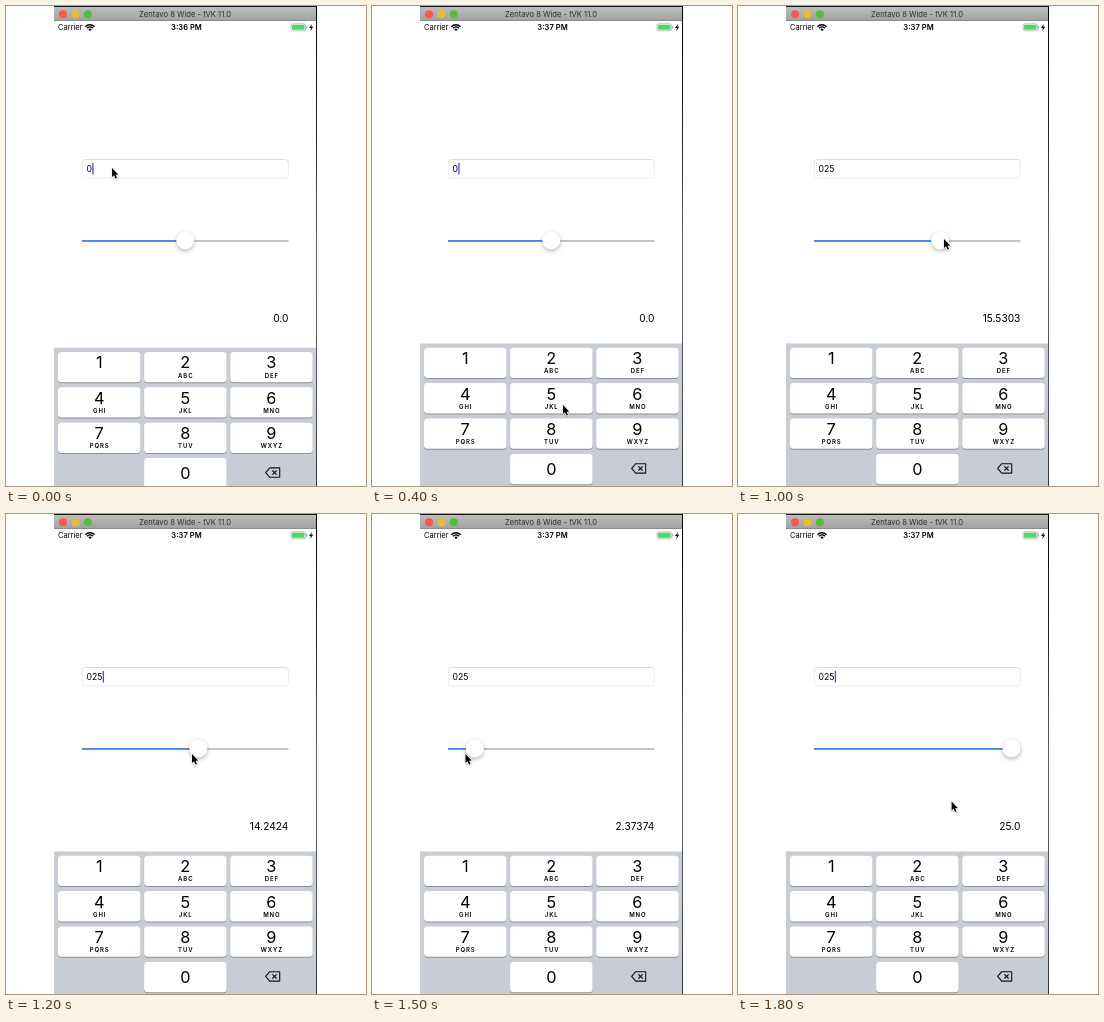
These frames come from a looping animation (360 px wide and 480 px high, 1900 ms). An HTML page with a canvas:

```html
<!DOCTYPE html>
<html lang="en">
<head>
<meta charset="utf-8">
<title>Slider demo</title>
<style>
html, body { margin: 0; width: 100%; height: 100%; overflow: hidden; background: #fff; }
canvas { display: block; width: 360px; height: 480px; }
</style>
</head>
<body>
<canvas id="stage"></canvas>
<script>
const W = 360, H = 480, STEP = 100;
const canvas = document.getElementById('stage');
const ctx = canvas.getContext('2d');
const ratio = window.devicePixelRatio || 1;
canvas.width = W * ratio;
canvas.height = H * ratio;

// One entry per step: pointer x, pointer y, caret visible, typed text, slider value (null = untouched)
const steps = [
  [106, 162, 1, '0', null],
  [106, 162, 0, '0', null],
  [130, 232, 1, '0', null],
  [172, 335, 0, '0', null],
  [191, 399, 1, '0', null],
  [187, 364, 1, '0', null],
  [186, 360, 1, '02', null],
  [187, 392, 0, '02', null],
  [188, 388, 1, '025', null],
  [184, 236, 1, '025', null],
  [206, 233, 0, '025', 15.5303],
  [229, 236, 0, '025', 18.8131],
  [186, 240, 1, '025', 14.2424],
  [144.3, 242, 0, '025', 9.31818],
  [119, 241, 1, '025', 5.85859],
  [93.5, 240, 0, '025', 2.37374],
  [66, 240, 0, '025', 0],
  [228, 241, 1, '025', 18.4343],
  [213.6, 287.5, 1, '025', 25]
];

function text(str, x, y, size, { weight = 400, align = 'left', color = '#000', spacing = 0 } = {}) {
  ctx.font = `${weight} ${size}px Inter, sans-serif`;
  ctx.letterSpacing = spacing + 'px';
  ctx.textAlign = align;
  ctx.fillStyle = color;
  ctx.fillText(str, x + (align === 'center' ? spacing / 2 : 0), y);
}

function rect(x, y, w, h, color) {
  ctx.fillStyle = color;
  ctx.fillRect(x, y, w, h);
}

function roundRect(x, y, w, h, r, fill, stroke, line = 1) {
  ctx.beginPath();
  ctx.roundRect(x, y, w, h, r);
  if (fill) { ctx.fillStyle = fill; ctx.fill(); }
  if (stroke) { ctx.strokeStyle = stroke; ctx.lineWidth = line; ctx.stroke(); }
}

function disc(x, y, r, color) {
  ctx.beginPath();
  ctx.arc(x, y, r, 0, Math.PI * 2);
  ctx.fillStyle = color;
  ctx.fill();
}

function polygon(points, fill) {
  ctx.beginPath();
  points.forEach(([x, y]) => ctx.lineTo(x, y));
  ctx.closePath();
  if (fill) { ctx.fillStyle = fill; ctx.fill(); }
}

function vertical(y0, y1, ...colors) {
  const g = ctx.createLinearGradient(0, y0, 0, y1);
  colors.forEach((c, i) => g.addColorStop(i / (colors.length - 1), c));
  return g;
}

function drawWindow() {
  rect(48, 0, 263, 15, vertical(1, 15, '#bdbdbd', '#a0a0a0'));
  rect(48, 0, 263, 1, '#181818');
  rect(48, 14.3, 263, 0.7, '#858585');
  rect(310, 0, 1, H, vertical(0, H, '#000', '#222', '#5c6470', '#555b66', '#30343c'));
  ['#fc5650', '#e6bd35', '#55bd38'].forEach((c, i) => disc(57 + i * 12.4, 8.2, 4, c));
  text('Zentavo 8 Wide - tVK 11.0', 179, 11.2, 7.6, { align: 'center', color: '#303030' });
}

function drawStatus(clock) {
  text('Carrier', 52, 24.3, 7.5);
  ctx.strokeStyle = '#000';
  ctx.lineWidth = 1.4;
  for (const r of [6.3, 4]) {
    ctx.beginPath();
    ctx.arc(84, 25, r, -Math.PI * 0.76, -Math.PI * 0.24);
    ctx.stroke();
  }
  ctx.beginPath();
  ctx.moveTo(84, 25);
  ctx.arc(84, 25, 2.3, -Math.PI * 0.76, -Math.PI * 0.24);
  ctx.fillStyle = '#000';
  ctx.fill();
  text(clock, 180.5, 24.3, 7.6, { weight: 600, align: 'center' });
  roundRect(285, 17.8, 14.6, 7, 1.8, null, '#8d9a8f', 0.6);
  roundRect(286, 18.8, 12.6, 5, 1, '#4cd964');
  rect(300.3, 20, 0.8, 2.6, '#8d9a8f');
  polygon([[306, 18], [303, 22], [304.9, 22], [304.2, 25], [307.2, 20.7], [305.3, 20.7]], '#000');
}

function drawField(value, caret) {
  roundRect(76.3, 153.5, 206, 18.5, 3, '#fff', vertical(153, 172, '#d4d4d4', '#ededed', '#e6e6e6'), 0.8);
  text(value, 80.5, 166, 8.7);
  if (caret) rect(80.8 + ctx.measureText(value).width, 157, 1.3, 11.5, '#4350d8');
}

function drawSlider(value) {
  const x = 85 + 188.5 * (value === null ? 0.5 : value / 25);
  rect(76, 234.2, 206.5, 1.5, '#b2b2b2');
  rect(76, 234.2, x - 76, 1.5, '#2a7df0');
  ctx.save();
  ctx.shadowColor = 'rgba(0,0,0,0.28)';
  ctx.shadowBlur = 4 * ratio;
  ctx.shadowOffsetY = 1.6 * ratio;
  disc(x, 234.5, 9, '#fff');
  ctx.restore();
  const v = value || 0;
  text(Number.isInteger(v) ? v.toFixed(1) : String(v), 282.4, 316.4, 10.2, { align: 'right' });
}

function drawBackspace(x, y) {
  polygon([[x - 7, y], [x - 3, y - 4.7], [x + 7, y - 4.7], [x + 7, y + 4.7], [x - 3, y + 4.7]]);
  ctx.strokeStyle = '#111';
  ctx.lineWidth = 1.1;
  ctx.lineJoin = 'round';
  ctx.stroke();
  ctx.beginPath();
  for (const s of [-1, 1]) {
    ctx.moveTo(x - 0.3, y - 2.1 * s);
    ctx.lineTo(x + 3.9, y + 2.1 * s);
  }
  ctx.stroke();
}

function drawKey(label, letters, col, row) {
  const x = 52 + col * 86.1, y = 341.7 + row * 35.4;
  roundRect(x, y + 1, 82.5, 30.3, 3.5, '#8d9096');
  roundRect(x, y, 82.5, 30.3, 3.5, '#fff');
  const mid = x + 41.2;
  text(label, mid, letters === null ? y + 20.9 : y + 16.5, 16.3, { align: 'center' });
  if (letters) text(letters, mid, y + 25.6, 6, { weight: 600, align: 'center', spacing: 0.9 });
}

function drawKeyboard(drop) {
  ctx.save();
  ctx.translate(0, drop);
  rect(48, 337.5, 262, H, '#c8ccd4');
  ['', 'ABC', 'DEF', 'GHI', 'JKL', 'MNO', 'PQRS', 'TUV', 'WXYZ']
    .forEach((letters, i) => drawKey(String(i + 1), letters, i % 3, Math.floor(i / 3)));
  drawKey('0', null, 1, 3);
  drawBackspace(266.7, 462.4);
  ctx.restore();
}

function drawPointer(x, y) {
  ctx.save();
  ctx.translate(x, y);
  ctx.shadowColor = 'rgba(0,0,0,0.3)';
  ctx.shadowBlur = 1.5 * ratio;
  ctx.shadowOffsetY = 0.6 * ratio;
  polygon([[0, 0], [0, 9], [2, 7.2], [3.5, 10.6], [5, 10], [3.6, 6.7], [6.2, 6.5]]);
  ctx.strokeStyle = '#fff';
  ctx.lineWidth = 1.5;
  ctx.lineJoin = 'round';
  ctx.stroke();
  ctx.shadowColor = 'transparent';
  ctx.fillStyle = '#000';
  ctx.fill();
  ctx.restore();
}

function render(now) {
  const i = Math.floor(now / STEP) % steps.length;
  const [px, py, caret, typed, value] = steps[i];
  ctx.setTransform(ratio, 0, 0, ratio, 0, 0);
  rect(0, 0, W, H, '#fff');
  drawWindow();
  drawStatus(i < 2 ? '3:36 PM' : '3:37 PM');
  drawField(typed, caret);
  drawSlider(value);
  drawKeyboard(i === 0 ? 4.2 : 0);
  drawPointer(px, py);
}

const start = performance.now();
function loop() {
  render(performance.now() - start);
  requestAnimationFrame(loop);
}
loop();
</script>
</body>
</html>
```
